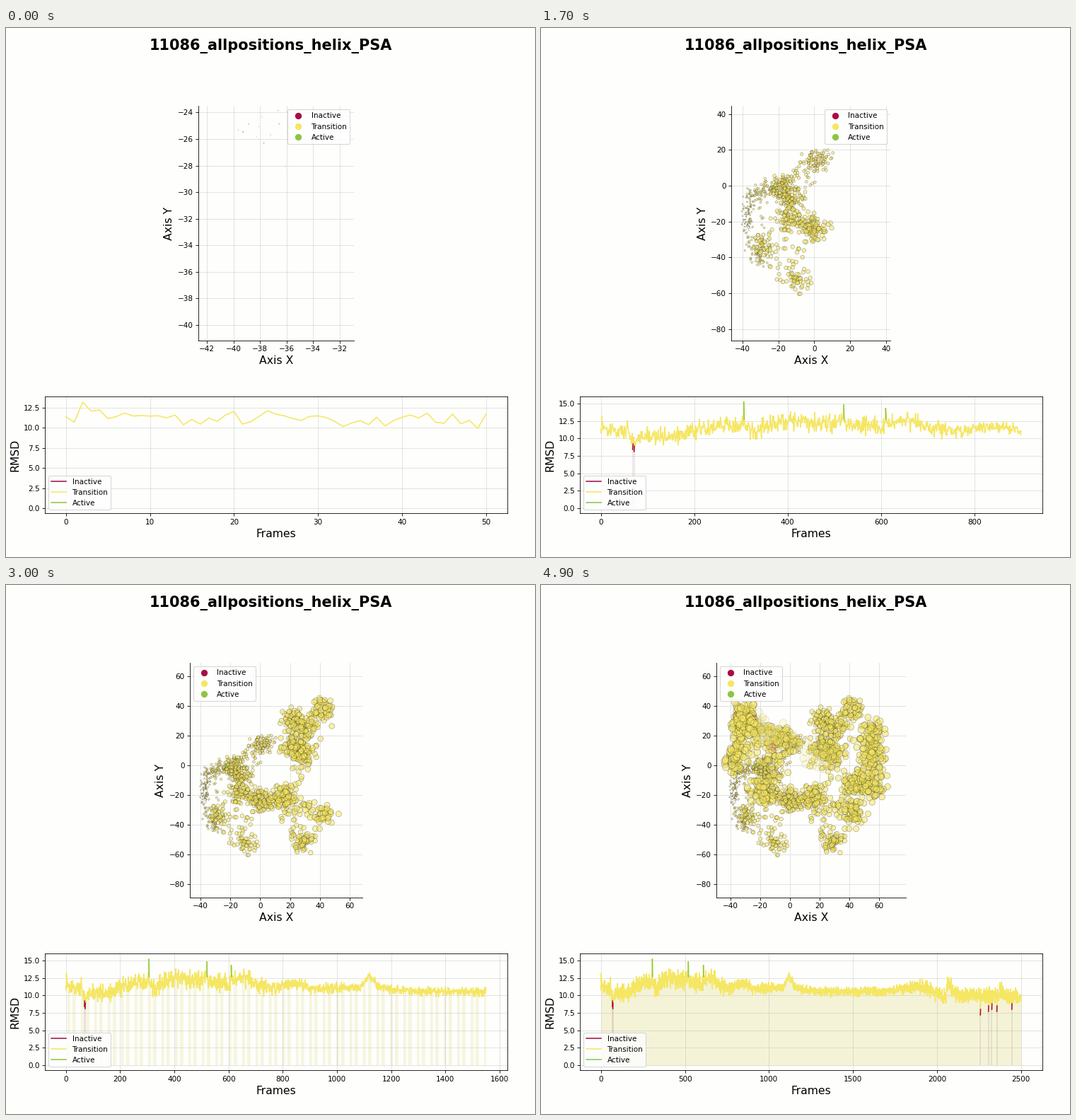
Animation of 748x748 px, one loop 5000 ms. Source, as a matplotlib script:

```python
import numpy as np
import matplotlib.pyplot as plt
from matplotlib.animation import FuncAnimation
from matplotlib.colors import to_rgba
from matplotlib.lines import Line2D

SIZE, DPI = 748, 75
STEP, FRAMES = 50, 50
LAST = STEP * FRAMES
PAPER = "#fefefc"
COLORS = {"Inactive": "#a80d45", "Transition": "#f5e663", "Active": "#8cc63f"}
PEAKS = {306: 15.2, 520: 14.8, 610: 14.3}
DIPS = {68: 8.4, 71: 8.1, 2258: 7.2, 2306: 7.7, 2326: 8.0, 2356: 7.7, 2445: 8.0}

# Places the trajectory visits in turn, lingering longer as it goes on
STOPS = [
    (-38, -25), (-37, -25), (-38, -21), (-37, -20), (-38, -12), (-35, -4), (-36, -34),
    (-29, -42), (-31, -5), (-24, -1), (-13, -8), (5, 15), (-2, 13), (-18, 0), (-19, -1),
    (-10, -7), (-29, -34), (-9, -53), (-15, -17), (-2, -22), (-1, -25), (14, -21),
    (29, -52), (20, 31), (29, 25), (30, 4), (21, 13), (42, 37), (16, -21), (44, -34),
    (41, -11), (57, -16), (56, 5), (55, 23), (-20, -18), (-3, 18), (-38, 3), (-32, 28),
    (-31, 34), (-17, 22), (24, 6),
]
TREND = [
    (0, 11.4), (50, 11), (57, 11.4), (70, 9.5), (90, 10.2), (175, 10.2), (185, 11.1),
    (300, 11.8), (330, 11), (380, 12.4), (480, 12.2), (600, 11.7), (655, 12.5),
    (740, 11), (850, 11.8), (900, 11), (1085, 11.1), (1120, 13), (1150, 11.3),
    (1200, 10.8), (1400, 10.5), (1700, 10.6), (1900, 11.3), (2050, 9.7),
    (2065, 11.8), (2110, 10.3), (2350, 9.8), (2380, 10.6), (2420, 9.7), (2500, 9.7),
]
# The spatial view widens between these moments
VIEW_AT = [0, 6, 13, 20, 30, 41]
VIEW = {
    "left": [-42.65, -44.7, -44.9, -47.4, -47.4, -49.3],
    "right": [-30.95, 10.2, 14.7, 63.6, 68.6, 77.9],
    "bottom": [-41.17, -67.6, -84.1, -88.2, -89, -89],
    "top": [-23.5, 29.3, 35.3, 51.6, 68.8, 68.8],
}

rng = np.random.default_rng(11)
index = np.arange(LAST + 1)
progress = index / LAST


def noise(limit):
    return np.clip(rng.normal(size=index.size), -limit, limit)


def make_path():
    stops = np.array(STOPS, float)
    at = progress ** (2 / 3) * (len(stops) - 1)
    k = np.minimum(at.astype(int), len(stops) - 2)
    leap = stops[k + 1] - stops[k]
    # Long leaps take a smaller share of the time, so few points lie on the way
    haste = np.maximum(1, np.hypot(*leap.T) / 15)
    t = np.clip((at - k - 0.5) * haste + 0.5, 0, 1)
    x, y = (stops[k] + leap * t[:, None]).T
    spread = 2 + 2.5 * np.sqrt(progress)
    narrow = np.interp(x, [-35, -15], [0.65, 1])
    return np.column_stack([np.maximum(x + spread * narrow * noise(2.2), -43.7),
                            y + spread * noise(2.2)])


def make_rmsd():
    jitter = np.interp(index, [660, 900, 1200, 1700, 2060], [0.62, 0.38, 0.3, 0.32, 0.6])
    values = np.maximum(np.interp(index, *zip(*TREND)) + jitter * noise(2.4), 8.9)
    values[2] = 13.2
    for i, value in {**PEAKS, **DIPS}.items():
        values[i] = value
        values[i + 1] = 12.7 if i in PEAKS else value + 0.8
    return values


path, rmsd = make_path(), make_rmsd()
faces = np.tile(to_rgba(COLORS["Transition"], 0.55), (index.size, 1))
faces[list(PEAKS)] = to_rgba(COLORS["Active"], 0.6)
faces[list(DIPS)] = to_rgba(COLORS["Inactive"], 0.2)
faces[(index > 2100) & (path[:, 0] > -22), 3] = 0.2
edges = np.zeros_like(faces)
edges[:, 3] = 0.75 * faces[:, 3]

side = (SIZE + 1e-6) / DPI
fig = plt.figure(figsize=(side, side), dpi=DPI, facecolor=PAPER)
fig.suptitle("11086_allpositions_helix_PSA", fontsize=20, fontweight="bold")


def add_panel(left, top, right, bottom):
    return fig.add_axes([left / SIZE, 1 - bottom / SIZE, (right - left) / SIZE,
                         (bottom - top) / SIZE], facecolor=PAPER)


def add_legend(ax, loc, **style):
    handles = [Line2D([0], [0], label=name, **{"color": c, **style},
                      markerfacecolor=c) for name, c in COLORS.items()]
    ax.legend(handles=handles, loc=loc)


space = add_panel(55, 110, 708.5, 442)
chart = add_panel(55, 521.5, 708.5, 686.5)
space.set_aspect("equal", adjustable="box")
space.spines[["top", "right"]].set_visible(False)
space.set_xlabel("Axis X", fontsize=15)
space.set_ylabel("Axis Y", fontsize=15)
space.grid(alpha=0.4)
dots = space.scatter(*path.T, s=index / 25, linewidths=0.5)
add_legend(space, "best", color="w", marker="o", markersize=10)


def shade(i, values):
    """Pale area below the curve: broken into stripes first, then solid."""
    n = i[-1]
    if n < 1350:
        return
    solid = n >= 1700
    phase = 594 * i / n % 19
    stripes = ((phase > 2) & (phase < 6)) | ((phase > 9) & (phase < 14))
    chart.fill_between(i, 0, values, where=solid | stripes, linewidth=0,
                       color="#f4f3d7" if solid else "#f6f5de")


def draw_space(frame, n):
    view = {name: np.interp(frame, VIEW_AT, stops) for name, stops in VIEW.items()}
    space.set(xlim=(view["left"], view["right"]), ylim=(view["bottom"], view["top"]))
    dots.set_offsets(path[:n + 1])
    dots.set_sizes(index[:n + 1] / 25)
    dots.set_facecolor(faces[:n + 1])
    dots.set_edgecolor(edges[:n + 1])


def draw_chart(n):
    i, values = index[:n + 1], rmsd[:n + 1]
    chart.clear()
    shade(i, values)
    chart.plot(i, values, color=COLORS["Transition"])
    for name, events in (("Inactive", DIPS), ("Active", PEAKS)):
        for e in (e for e in events if e < n):
            chart.plot([e, e + 1], rmsd[e:e + 2], color=COLORS[name])
            if name == "Inactive":
                chart.vlines(e, 0, rmsd[e], color="#8a4a68", alpha=0.16, linewidth=1.5)
    peak = values.max()
    chart.set(xlim=(-0.05 * n, 1.05 * n), ylim=(-0.05 * peak, 1.05 * peak))
    chart.grid(alpha=0.4)
    chart.set_xlabel("Frames", fontsize=15)
    chart.set_ylabel("RMSD", fontsize=15)
    add_legend(chart, "lower left")


def draw(frame):
    n = STEP * (frame + 1)
    draw_space(frame, n)
    draw_chart(n)
    return []


anim = FuncAnimation(fig, draw, frames=FRAMES, interval=100, repeat=True, repeat_delay=0)
plt.show()
```
